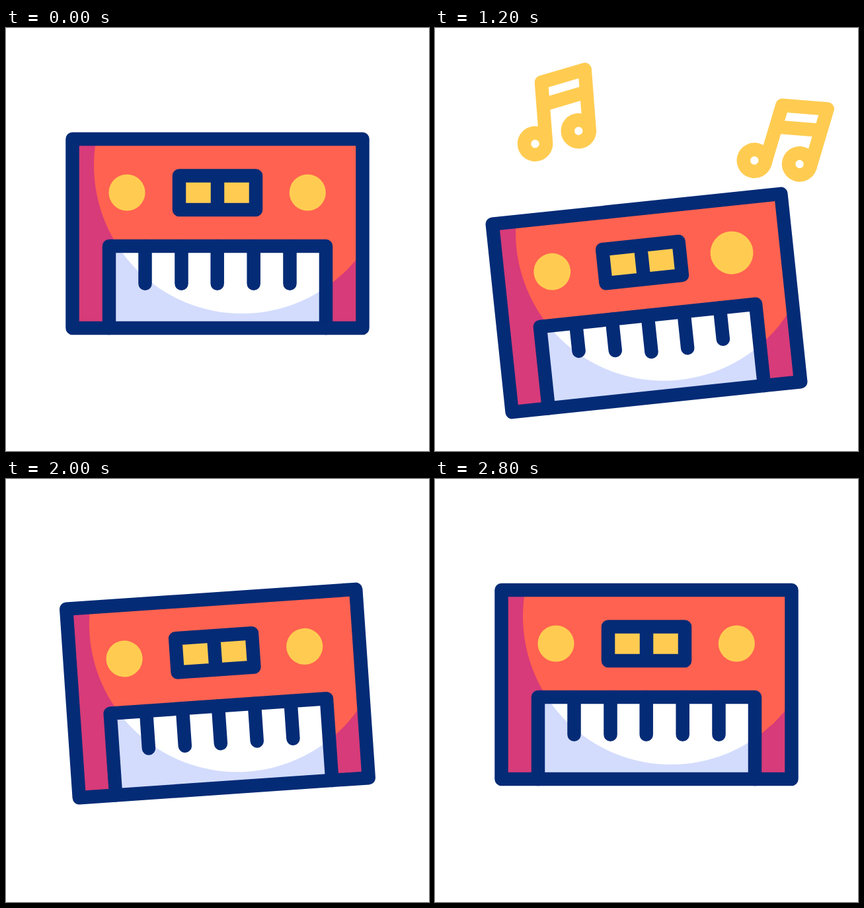
An HTML page that plays this animation: 640 by 640 pixels, repeating every 3 s.

```html
<!DOCTYPE html>
<html lang="en">
<head>
<meta charset="utf-8">
<title>Keyboard and notes</title>
<style>
  html, body { margin: 0; width: 100%; height: 100%; overflow: hidden; background: #fff; }
  svg { display: block; width: 100%; height: 100%; }
  .line { fill: none; stroke: #042b76; stroke-width: 20.5; stroke-linecap: round; stroke-linejoin: round; }
  .note { fill: none; stroke: #ffcc51; stroke-width: 20.5; stroke-linecap: round; stroke-linejoin: round; }
</style>
</head>
<body>
<svg viewBox="0 0 640 640">
  <defs>
    <clipPath id="case"><rect x="100" y="168" width="440" height="286"/></clipPath>
    <clipPath id="keybed"><rect x="156" y="330" width="328" height="124"/></clipPath>
    <!-- drawn around its own centre -->
    <g id="note" transform="translate(-17 -47)">
      <path d="M0 92V0L67 -14.3V77.7M0 34L67 19.7"/>
      <circle cx="-16.5" cy="92" r="16.5"/>
      <circle cx="50.5" cy="77.7" r="16.5"/>
    </g>
  </defs>
  <use id="noteL" class="note" href="#note"/>
  <use id="noteR" class="note" href="#note"/>
  <g id="body">
    <rect x="100.5" y="168" width="439" height="286" fill="#d73b79"/>
    <circle cx="357" cy="208" r="224" fill="#ff6250" clip-path="url(#case)"/>
    <rect x="156" y="330" width="328" height="124" fill="#d3dcfd"/>
    <circle cx="357" cy="208" r="224" fill="#fff" clip-path="url(#keybed)"/>
    <circle id="knobL" cx="183" cy="249" fill="#ffcc51"/>
    <circle id="knobR" cx="456.3" cy="249" fill="#ffcc51"/>
    <rect x="262" y="223.5" width="116" height="51.5" fill="#ffcc51"/>
    <path class="line" d="M262 223.5H378V275H262ZM320 223.5V275"/>
    <path id="keys" class="line"/>
    <path class="line" d="M156 454V330H484V454"/>
    <rect class="line" x="100.5" y="168" width="439" height="286"/>
  </g>
</svg>
<script>
const LOOP = 3000, STEP = 40;
const KEY_X = [210.5, 265.5, 319.7, 374.7, 429.5];
const el = id => document.getElementById(id);
const body = el('body'), keys = el('keys');
const clamp = v => Math.min(1, Math.max(0, v));
const span = (t, a, b) => clamp((t - a) / (b - a));
const swing = u => (1 - Math.cos(Math.PI * u)) / 2;

// cubic-bezier(.333, 0, .2, 1)
function settle(u) {
  if (u <= 0 || u >= 1) return clamp(u);
  let lo = 0, hi = 1, s = 0;
  for (let i = 0; i < 30; i++) {
    s = (lo + hi) / 2;
    const x = s * (1 - s) * (1 - s) + 0.6 * (1 - s) * s * s + s * s * s;
    if (x < u) lo = s; else hi = s;
  }
  return s * s * (3 - 2 * s);
}

// two smooth pulses of the given period
function pulse(t, start, period) {
  const u = (t - start) / period;
  return u > 0 && u < 2 ? swing(2 * u) : 0;
}

function drawNote(node, t, n) {
  const age = t - n.start;
  const rest = 1 - clamp(age / 900);
  const y = n.top + 191 * rest * rest;
  const wave = Math.cos((0.344 * age + 9) * Math.PI / 180);
  const turn = n.side * (n.lean + 10 * wave);
  const alpha = span(age, 0, 120) * (1 - span(t, n.fade, n.fade + 120));
  node.setAttribute('transform', `translate(${n.x} ${y}) rotate(${turn})`);
  node.setAttribute('opacity', alpha);
}

function draw(t) {
  const dy = 105 * settle(span(t, 140, 790))
    - 131 * settle(span(t, 1735, 2352))
    + 26 * settle(span(t, 2352, 2800));
  const turn = -6 * (swing(span(t, 150, 790)) - swing(span(t, 1745, 2380)));
  body.setAttribute('transform', `translate(0 ${dy}) rotate(${turn} 320 311)`);

  keys.setAttribute('d', KEY_X.map((x, i) =>
    `M${x} 330V${386.8 - 14 * pulse(t, 600 + 80 * i, 400)}`).join(''));
  el('knobL').setAttribute('r', 27.5 + 8.9 * pulse(t, 560, 600));
  el('knobR').setAttribute('r', 27.5 + 8.9 * pulse(t, 760, 600));

  drawNote(el('noteL'), t, { start: 700, x: 181.5, top: 90, side: -1, lean: 14.4, fade: 1390 });
  drawNote(el('noteR'), t, { start: 907, x: 528.3, top: 80, side: 1, lean: 20, fade: 1620 });
}

const begin = performance.now();
function tick() {
  const t = (performance.now() - begin) % LOOP;
  draw(Math.floor(t / STEP) * STEP);
  requestAnimationFrame(tick);
}
tick();
</script>
</body>
</html>
```
